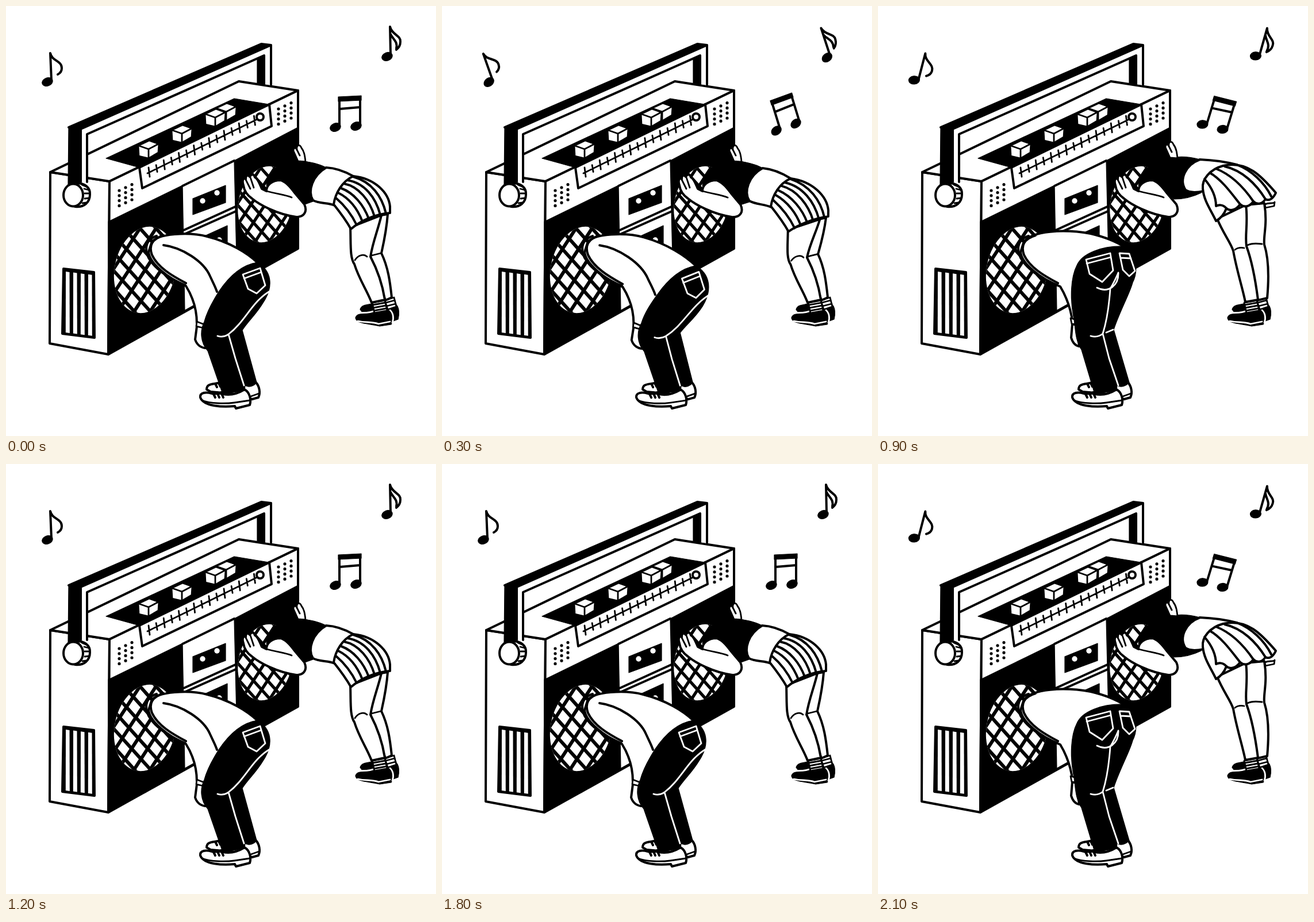
Recreate the animation shown at these times as an HTML page. Size 748 px wide and 748 px high, loop 2400 ms.

```html
<!DOCTYPE html>
<html lang="en">
<head>
<meta charset="utf-8">
<title>Boombox dance</title>
<style>
html, body { margin: 0; width: 100%; height: 100%; overflow: hidden; background: #fff; }
svg { display: block; width: 100vw; height: 100vh; }
path, ellipse { stroke-linejoin: round; stroke-linecap: round; }
.w { fill: #fff; stroke: #000; stroke-width: 4; }
.k { fill: #000; stroke: #000; stroke-width: 1.2; }
.l { fill: none; stroke: #000; stroke-width: 4; }
.i { fill: none; stroke: #fff; stroke-width: 2.8; }
.f { fill: #fff; }
.thin { stroke-width: 2.8; }
</style>
</head>
<body>
<svg id="stage" viewBox="0 0 748 748"></svg>
<script>
const path = (cls, d) => `<path class="${cls}" d="${d}"/>`;
const oval = (cls, x, y, rx, ry = rx, turn = 0) =>
  `<ellipse class="${cls}" cx="${x}" cy="${y}" rx="${rx}" ry="${ry}" transform="rotate(${turn} ${x} ${y})"/>`;
const list = (n, make) => Array.from({ length: n }, (_, i) => make(i)).join('');
const at = (x, y, body) => `<g transform="translate(${x} ${y})">${body}</g>`;

// ---- boombox ----
const cube = (x, y) => at(x, y,
  path('w thin', 'M230,243 L249,234 L266,240 L265,255 L248,265 L231,261Z') +
  path('l thin', 'M231,243 L248,249 L265,240 M248,249 L248,264'));

const dots = (x, y) => list(12, i => {
  const c = i % 3, r = (i - c) / 3;
  return oval('k', x + 11 * c, y - 5.2 * c + 8.8 * r, 2);
});

const speaker = (id, x, y, scale) => `<g transform="translate(${x} ${y}) scale(${scale})">
  <clipPath id="${id}"><ellipse rx="53" ry="76" transform="rotate(12)"/></clipPath>
  <g clip-path="url(#${id})">${oval('f', 0, 0, 100)}
  <g style="stroke:#000;stroke-width:6">${list(13, i => {
    const s = (i - 6) * 28;
    return `<path d="M${s - 90},-100 l180,200 M${s + 65},-100 l-130,200"/>`;
  })}</g></g></g>`;

const handle =
  path('f', 'M130,214 L141,223 L141,309 L130,309Z M449,86 L461,68 L461,138 L449,136Z') +
  path('k', 'M109,211 L444,65 L461,68 L130,214 L130,308 L108,312Z') +
  path('l', 'M109,211 L444,66 L461,68 L130,214 L130,306 M461,68 L461,137 M141,306 L141,223 L449,86 L449,136') +
  path('k', 'M437,92 L449,86 L449,136 L437,134Z') +
  path('w', 'M120,309 C136,306 147,316 146,328 C146,341 136,351 120,349Z') +
  path('l thin', 'M132,311 l7,3 M136,318 l8,2 M137,326 l8,0 M137,335 l8,-1 M133,343 l7,-1') +
  oval('w', 117, 329, 17, 19.5);

const vent =
  path('k', 'M100,457 L153,463 L154,577 L98,570Z') +
  path('l', 'M100,457 L153,463 L154,577 L98,570Z') +
  list(4, i => path('f', `M${104 + 13 * i},${462 + 1.6 * i} l6.5,1 l.3,106 l-7,-1Z`));

const ticks = list(15, i => {
  const x = 249 + 13.1 * i, y = 289 - 6.42 * i, h = i % 2 ? 6 : 8;
  return `M${x - 1},${y - h} l2,${2 * h} `;
});

const boombox =
  path('w', 'M77,289 L180,305 L178,606 L76,587Z') +
  path('w', 'M77,289 L405,131 L508,147 L180,305Z') +
  path('w', 'M180,305 L508,147 L508,422 L178,606Z') +
  path('k', 'M174,265 L397,161 L457,171 L232,281Z') +
  cube(0, 0) + cube(58, -27) + cube(135, -65) + cube(116, -55) +
  path('l', 'M232,281 L458,171 L462,209 L237,317Z') +
  path('l thin', 'M246,291 L437,197 ' + ticks) +
  oval('w', 442, 193, 6) +
  dots(197, 321) + dots(474, 179) +
  path('k', 'M178,375 L307,312 L311,531 L178,606Z') +
  path('k', 'M397,269 L508,211 L508,422 L402,481Z') +
  path('l', 'M307,313 L397,269 M309,390 L399,349 M310,397 L400,357 M311,531 L402,480') +
  path('k', 'M325,335 L382,312 L382,342 L325,363Z') +
  oval('f', 342, 339, 4.7) + oval('f', 367, 325, 4.7) +
  path('k', 'M328,408 L385,382 L385,418 L328,440Z') + oval('f', 371, 407, 4.7) +
  speaker('left', 242, 459, 1) + speaker('right', 451, 345, .88) +
  handle + vent;

// ---- dancers ----
const arm =
  path('w', `M413,312 C410,303 413,298 417,301 C417,294 421,293 424,297 C427,291 432,293 433,298
    C438,300 441,309 445,318 L453,322 C453,312 462,303 478,303 C490,308 497,318 503,326
    L519,345 C525,358 518,367 505,367 C470,362 440,345 428,335 C418,328 414,320 413,312Z`) +
  path('l thin', 'M417,302 L425,318 M425,298 L431,316 M453,322 C472,327 488,329 497,333');

const farHand = y => at(0, y,
  path('w thin', 'M508,268 L500,250 C500,244 504,244 506,248 C505,239 511,238 514,245 C519,251 520,260 521,269Z') +
  path('l thin', 'M506,248 L511,258'));

const pumps =
  path('k', 'M616,528 C619,518 630,521 638,517 L678,519 C685,524 684,538 682,545 L671,549 L664,540 L620,533Z') +
  path('k', 'M608,543 C609,532 629,536 640,532 L664,528 C675,535 673,549 670,554 L650,557 C630,552 610,553 608,543Z') +
  path('i', 'M613,534 C622,533 632,535 641,530 M666,527 C674,533 675,543 672,551 M612,548 C626,551 638,549 648,553 L668,549') +
  path('w thin', 'M659,512 L675,507 L679,523 L664,528Z M637,516 L659,512 L663,530 L641,534Z') +
  path('l thin', 'M638,520 L660,516 M639,525 L661,521 M640,530 L662,526 M661,516 L676,512 M662,522 L678,518');

const sneakers =
  path('w', `M349,667 C349,655 362,659 376,654 L434,654 C441,661 443,673 439,681 L428,684 L410,676 L356,671Z`) +
  path('w', `M338,681 C337,672 348,671 358,674 C366,676 370,672 377,675 C390,678 402,675 415,667
    C424,672 427,685 424,694 L400,700 L398,696 C378,698 344,697 338,681Z`) +
  path('l thin', 'M341,686 C356,692 382,692 397,690 L424,686 M426,679 L440,674') +
  path('l', 'M360,673 l4,8 M367,672 l4,9 M374,672 l4,9 M364,657 l3,6 M370,656 l3,6');

const collar = path('l', `M262,400 C244,406 240,420 248,438 C258,456 280,472 312,486
  M274,399 C254,405 248,417 254,433 C264,455 290,470 313,482`);

const bent = {
  woman:
    pumps +
    path('w', 'M640,366 L664,362 C662,390 657,412 653,430 C665,455 668,480 671,507 L660,512 L634,440Z') +
    path('w', 'M599,385 C600,415 598,438 606,449 C614,475 628,495 636,516 L659,511 C655,485 645,457 634,436 C638,410 647,390 653,364Z') +
    path('l thin', 'M607,442 C612,434 622,430 628,436 M636,434 L652,430') +
    path('k', `M475,278 C460,288 450,304 454,316 L478,303 L503,326 L520,345 L534,340 C524,322 533,295 557,281
      C540,272 520,270 508,269Z`) +
    farHand(2) +
    path('w', 'M557,281 C576,282 590,288 604,296 L572,347 C560,342 545,344 534,338 C524,322 533,295 557,281Z') +
    path('w', 'M604,296 C642,300 666,325 668,349 L668,360 C640,362 615,375 600,388 C590,370 578,355 570,345 C573,325 585,305 604,296Z') +
    path('l', `M574,334 C588,346 601,362 610,381 M578,325 C598,335 612,354 620,375 M583,317 C605,325 622,346 631,370
      M588,309 C614,314 633,339 641,366 M594,303 C624,308 643,333 651,363 M604,297 C636,306 654,331 661,361`) + arm,
  man:
    sneakers +
    path('w', `M253,412 C262,395 320,393 350,401 C390,411 420,430 437,446 L385,520 L345,558 L332,553
      C332,530 325,506 313,487 C282,474 250,448 248,428Z`) +
    collar +
    path('l', 'M274,416 C306,420 344,444 355,470 C360,481 364,488 367,497') +
    path('w', 'M332,557 L329,580 C332,590 340,595 348,595 L345,558Z') +
    path('w thin', 'M332,549 L345,554 L343,560 L331,557Z') +
    path('k', `M370,497 C388,470 410,450 437,446 C462,460 466,487 448,515 C435,537 422,547 411,564
      L436,655 C430,662 422,664 416,660 L415,669 L377,675 L351,600 C338,585 337,565 345,549 C350,530 360,513 370,497Z`) +
    path('i', 'M459,496 C428,514 416,549 387,571 L399,613 L414,660 M387,571 C381,575 374,576 368,574') +
    path('i', 'M412,467 L442,456 L451,486 L436,500 L421,492Z M414,474 L444,463'),
};

const twisted = {
  woman:
    pumps +
    path('w', 'M640,346 L672,343 C678,380 670,400 672,415 C680,440 680,475 677,508 L660,512 L640,418Z') +
    path('w', 'M590,370 C600,395 614,412 618,426 C624,460 634,490 639,515 L661,511 C657,480 651,445 641,418 C638,398 644,378 640,346Z') +
    path('l thin', 'M621,424 C626,420 632,420 637,421 M643,416 C650,412 660,413 668,414') +
    path('k', `M475,278 C460,288 450,304 454,316 L478,303 L503,326 L515,336 C532,336 550,331 562,325
      C524,318 526,278 560,267 C540,261 520,262 508,264Z`) +
    farHand(-4) +
    path('w', 'M560,267 C582,268 605,271 624,276 L567,322 C552,325 542,325 535,320 C523,302 535,276 560,267Z') +
    path('w thin', 'M673,345 C681,341 687,345 690,341 L689,348 L674,351Z') +
    path('w', `M600,278 C642,268 668,297 692,325 C688,334 681,340 674,336 C668,345 659,346 653,340
      C645,351 636,350 630,345 C622,356 612,357 606,352 C602,363 595,370 588,374 C580,356 567,340 565,318 C563,301 578,284 600,278Z`) +
    path('l', `M568,301 C580,315 588,330 588,348 C594,345 601,346 606,352 M577,290 C598,302 615,326 630,345
      M588,283 C616,294 638,318 653,340 M603,279 C634,286 658,310 674,336 M624,276 C650,286 672,307 684,331`) + arm,
  man:
    sneakers +
    path('w', `M253,412 C266,390 325,388 370,396 C395,402 415,410 430,420 L385,520 L346,558 L339,553
      C336,530 328,506 317,488 C282,474 250,448 248,428Z`) +
    collar +
    path('w', 'M338,553 L336,577 C339,587 344,591 350,592 L346,555Z') +
    path('w thin', 'M335,543 L345,546 L346,554 L337,553Z') +
    path('k', `M346,451 C355,430 390,417 427,418 C447,432 455,457 443,481 C438,500 421,530 410,563
      L437,655 C430,662 422,664 416,660 L415,669 L377,675 L354,598 C342,580 344,560 340,540 C334,510 335,472 346,451Z`) +
    path('i', `M404,492 C402,520 398,548 391,570 L402,613 L418,660 M391,570 C384,576 377,576 370,574
      M397,568 L409,563 M381,490 C401,500 419,486 418,464 M418,464 C413,476 408,485 404,492`) +
    path('i', `M362,441 L404,430 L409,460 L390,480 L368,466Z M363,448 L405,437
      M420,430 L437,431 L447,461 L437,470 L426,459Z M422,438 L440,439`),
};

// Pushes the points near a hip down and outward; limbs far from it stay put.
const sink = (body, hx, hy, dx, dy, reach) =>
  body.replace(/(-?[\d.]+),(-?[\d.]+)/g, (_, x, y) => {
    const k = Math.exp(-((x - hx) ** 2 + (y - hy) ** 2) / reach ** 2);
    return `${+x + dx * k},${+y + dy * k}`;
  });
const sunk = {
  woman: sink(bent.woman, 635, 345, 5, 8, 70),
  man: sink(bent.man, 425, 495, 6, 8, 90),
};

// ---- notes ----
const head = (x, y) => oval('k', x, y, 9.5, 7, -22);
const tilt = (body, turn, x, y, dx = 0, dy = 0) =>
  `<g transform="translate(${turn > 0 ? dx : 0} ${turn > 0 ? dy : 0}) rotate(${turn} ${x} ${y})">${body}</g>`;
const notes = turn =>
  tilt(head(72, 132) + path('l', 'M79,129 L77,82 C80,96 97,95 97,108 C97,114 94,117 90,119'), turn, 78, 100) +
  tilt(head(663, 88) + path('l', 'M669,85 L668,36 C671,50 687,51 686,62 C686,68 683,73 679,76 M669,49 C672,57 682,61 679,74'),
    turn, 672, 66, 0, 2.5) +
  tilt(head(573, 211) + head(609, 209) + path('l', 'M580,209 L580,160 M616,207 L616,159 M581,179 L616,176') +
    path('k', 'M578,158 L618,156 L618,164 L578,166Z'), turn, 597, 185, -2, 3);

// ---- stage ----
const poses = [[bent, 0], [sunk, -17], [bent, 0], [twisted, 17]];
const stage = document.getElementById('stage');
stage.innerHTML = boombox + '<g id="dance"></g>';
const dance = document.getElementById('dance');
const scenes = poses.map(([who, turn]) => who.woman + who.man + notes(turn));
let shown = -1;

function draw() {
  const step = Math.floor(performance.now() / 300) % scenes.length;
  if (step !== shown) dance.innerHTML = scenes[shown = step];
  requestAnimationFrame(draw);
}
draw();
</script>
</body>
</html>
```
